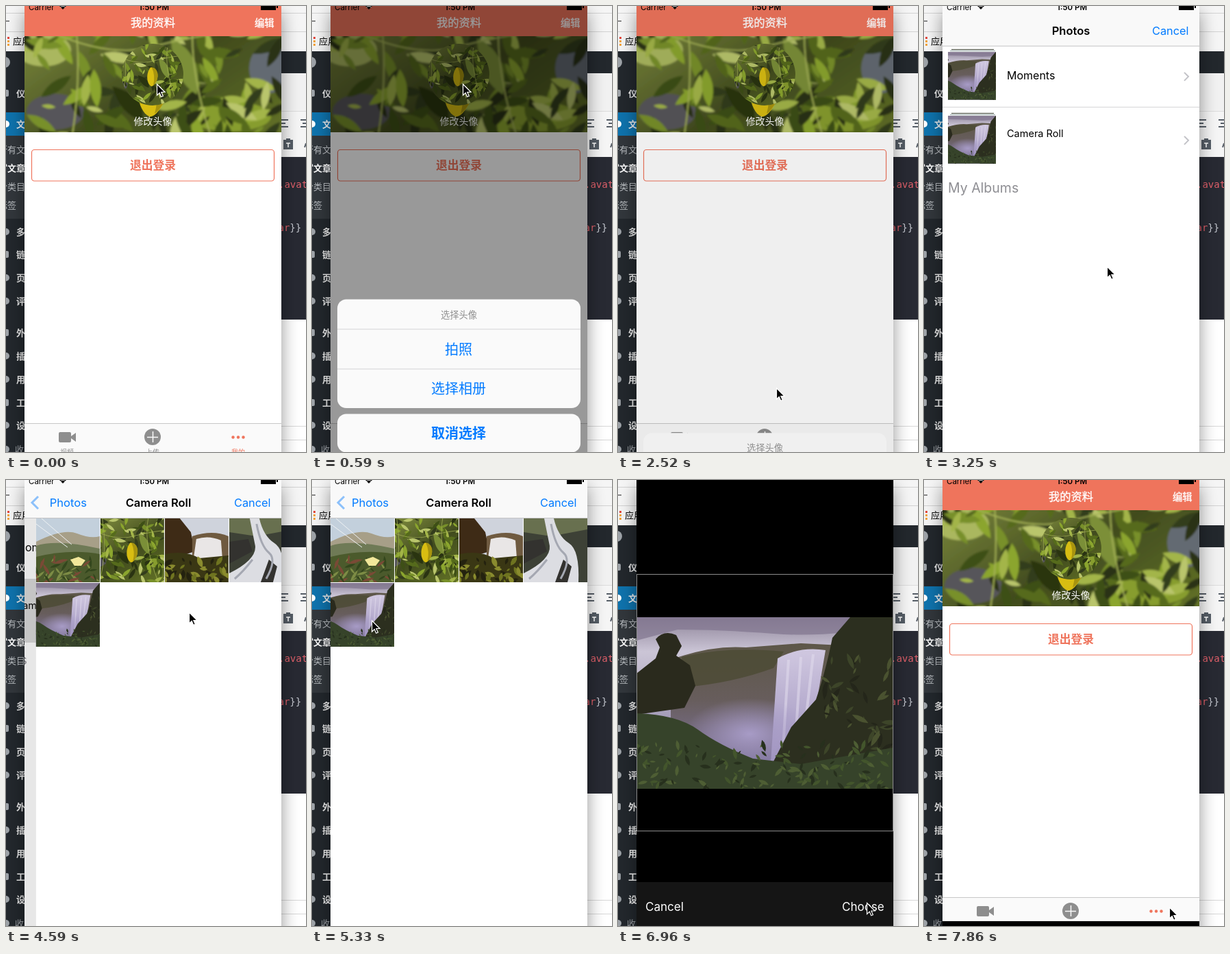
These frames come from a looping animation (438x650 px, 8 s). An HTML page:

```html
<!DOCTYPE html>
<html lang="zh">
<head>
<meta charset="utf-8">
<style>
  html, body { margin: 0; width: 100%; height: 100%; overflow: hidden; background: #fff; }
  svg { display: block; }
  text { font: 16px Inter, "Noto Sans CJK SC", "Noto Sans CJK", sans-serif; }
  .mid { text-anchor: middle; }
  .bold { font-weight: 600; }
  .medium { stroke: #fff; stroke-width: .35px; }
  .blue { fill: #007aff; }
  .code { font: 14px "DejaVu Sans Mono", monospace; }
  .line { stroke: #d4d4d6; }
</style>
</head>
<body>
<svg width="438" height="650" viewBox="0 0 438 650">
  <defs>
    <clipPath id="screen"><rect x="27" y="-9" width="375" height="667"/></clipPath>
    <clipPath id="round"><circle cx="214" cy="100" r="45"/></clipPath>
    <filter id="shadow" x="-20%" width="140%"><feGaussianBlur stdDeviation="13"/></filter>
    <filter id="soft" x="0" y="0" width="100%" height="100%"><feGaussianBlur stdDeviation="1.5"/></filter>
    <linearGradient id="leafBg" x2="1" y2="1"><stop stop-color="#8d9a45"/><stop offset=".5" stop-color="#414b1e"/><stop offset="1" stop-color="#6d7e28"/></linearGradient>
    <linearGradient id="sky" x2="0" y2="1"><stop stop-color="#8d8398"/><stop offset=".2" stop-color="#cbc5d6"/><stop offset="1" stop-color="#7d729a"/></linearGradient>
    <linearGradient id="cliff" x2="0" y2="1"><stop stop-color="#5d5748"/><stop offset=".45" stop-color="#675d5c"/><stop offset="1" stop-color="#8176a3"/></linearGradient>
    <linearGradient id="fallFill" x2="0" y2="1"><stop stop-color="#d0c8e0"/><stop offset="1" stop-color="#9d91bd"/></linearGradient>
    <radialGradient id="mist"><stop stop-color="#a79bc6"/><stop offset="1" stop-color="#a79bc6" stop-opacity="0"/></radialGradient>

    <symbol id="pepper" viewBox="0 0 375 250" preserveAspectRatio="xMidYMid slice">
      <g filter="url(#soft)">
        <rect x="-9" y="-9" width="393" height="268" fill="url(#leafBg)"/>
        <ellipse cx="358" cy="102" rx="30" ry="36" fill="#646a72"/>
        <ellipse cx="45" cy="165" rx="42" ry="26" fill="#56555a"/>
        <ellipse cx="28" cy="75" rx="40" ry="24" fill="#aab75e"/>
        <ellipse cx="300" cy="172" rx="60" ry="22" fill="#879d2e"/>
        <g id="leaves"></g>
        <path d="M214 58Q262 80 252 140Q216 120 214 58Z" fill="#7b8f38"/>
        <path d="M128 128Q140 170 172 178Q178 140 128 128Z" fill="#2a3410"/>
        <path d="M20 40Q120 90 190 70T375 40M70 0Q90 120 60 250M250 0Q230 100 290 250" fill="none" stroke="#a5b256" stroke-width="2"/>
      </g>
      <path d="M180 95C206 98 214 126 204 150Q192 174 182 172C164 164 158 120 180 95Z" fill="#d8bd12"/>
      <path d="M184 95C208 98 214 126 204 150Q198 162 190 168Q200 130 184 95Z" fill="#a8940f"/>
    </symbol>

    <symbol id="falls" viewBox="0 0 375 250" preserveAspectRatio="xMidYMid slice">
      <rect width="375" height="250" fill="url(#sky)"/>
      <path d="M0 0H375V12Q280 30 200 24T60 18L0 34Z" fill="#80768f" opacity=".7"/>
      <path d="M50 62Q110 40 160 44L240 38L320 42V220H50Z" fill="url(#cliff)"/>
      <path d="M66 58Q130 42 215 50L200 74Q140 96 70 102Z" fill="#4b4a34" opacity=".8"/>
      <path d="M206 60Q238 42 276 48L262 130L240 212H196Z" fill="url(#fallFill)"/>
      <path d="M222 62L214 190M240 58L232 180M258 54L246 160" stroke="#e0daec" stroke-width="4" opacity=".6"/>
      <ellipse cx="165" cy="170" rx="95" ry="52" fill="url(#mist)"/>
      <path d="M375 0H312L286 30Q276 80 262 120L226 160L198 214L230 250H375Z" fill="#2c2f1f"/>
      <g id="rock"></g>
      <path d="M0 82L28 60L34 44L28 32Q40 18 58 26L66 42L58 56L78 70L86 100L70 132L0 142Z" fill="#2a2a1d"/>
      <path d="M0 140Q60 142 90 164T170 206L240 214L375 190V250H0Z" fill="#36432a"/>
      <g id="grass"></g>
    </symbol>

    <symbol id="dune" viewBox="0 0 93 93">
      <rect width="93" height="93" fill="#c3d0dc"/>
      <path d="M0 34Q40 14 60 22T93 26V93H0Z" fill="#a79f88"/>
      <path d="M0 40Q30 30 93 44V60H0Z" fill="#6f7a56"/>
      <path d="M0 56Q50 44 93 52V93H0Z" fill="#4b5a2c"/>
      <path d="M0 8L46 42M8 0L52 38" stroke="#eef1f3"/>
      <g id="stalks"></g>
      <path d="M50 60L62 56L72 61L66 69H56Z" fill="#f1e79a"/>
    </symbol>

    <symbol id="cascade" viewBox="0 0 93 93">
      <rect width="93" height="93" fill="#cfd3dc"/>
      <path d="M0 0H22L38 20L44 48L0 62Z" fill="#3e2b16"/>
      <path d="M40 26Q70 16 93 26V56H40Z" fill="#6f5a40"/>
      <path d="M46 30Q64 24 82 32L84 58H42Z" fill="#e9e6e6"/>
      <path d="M0 52Q30 46 50 58L93 54V93H0Z" fill="#3a3714"/>
      <g id="moss"></g>
    </symbol>

    <symbol id="stream" viewBox="0 0 93 93">
      <rect width="93" height="93" fill="#3d4136"/>
      <path d="M0 0H93V16L40 26L0 20Z" fill="#68704f"/>
      <path d="M30 0H44Q50 26 66 36T80 93H0V80Q40 60 38 40Z" fill="#dcdde2"/>
      <path d="M0 34L28 30L34 48L0 66ZM58 60L70 70L64 93H46Z" fill="#33322f"/>
      <path d="M40 8Q46 40 58 50T54 88M34 60Q20 78 8 88" fill="none" stroke="#a5a8b2" stroke-width="3"/>
    </symbol>

    <g id="stack">
      <path d="M40 60.5H102" stroke="#333a2c"/><path d="M38 62.5H104" stroke="#8fa0a0"/>
      <use href="#falls" x="35" y="64" width="70" height="70"/>
      <path d="M380 94L386 100L380 106" fill="none" stroke="#c2c2c7" stroke-width="2"/>
    </g>
  </defs>

  <!-- desktop behind the phone -->
  <rect width="438" height="650" fill="#fff"/>
  <rect width="438" height="66" fill="#f5f5f5"/>
  <path d="M0 10.5H438M0 37.5H438" stroke="#d2d2d2"/>
  <path d="M0 22H5" stroke="#888" stroke-width="2"/>
  <path d="M2 45h3v3h-3z" fill="#e2483d"/><path d="M2 50h3v3h-3zM2 55h3v3h-3z" fill="#f2a33a"/>
  <text x="10" y="56" style="font-size:13px">应用</text>
  <rect y="66" width="438" height="32" fill="#23282d"/>
  <rect y="66" width="27" height="584" fill="#23282d"/>
  <rect y="188" width="27" height="122" fill="#32373c"/>
  <rect y="155" width="27" height="34" fill="#0f73ad"/>
  <circle cx="-2" cy="82" r="8" fill="#9ea3a8"/>
  <g id="menu"></g>
  <rect x="402" y="98" width="36" height="122" fill="#f1f1f1"/>
  <rect x="402" y="153" width="36" height="67" fill="#f5f5f5"/>
  <path d="M402 153.5H438" stroke="#ddd"/>
  <path d="M400 166H412M400 171H408M400 176H412M430 166H438M433 171H438M430 176H438" stroke="#555d66" stroke-width="2"/>
  <path d="M405 195H419V209H405ZM409 193H415V196H409Z" fill="#555d66"/>
  <path d="M409 200H415M412 200V206" stroke="#fff" stroke-width="1.5"/>
  <path d="M438 200L436 206" stroke="#555d66" stroke-width="2"/>
  <rect x="402" y="220" width="36" height="237" fill="#282a33"/>
  <text class="code" x="398" y="265" fill="#e0606a">.avat</text>
  <text class="code" x="397.500" y="328" fill="#e0606a">ar<tspan fill="#c5c8d0">}}</tspan></text>
  <path d="M402 612.5H438M402 632.5H438" stroke="#d8d8d8"/>
  <rect x="27" y="10" width="375" height="720" opacity=".42" filter="url(#shadow)"/>

  <g clip-path="url(#screen)">
    <!-- profile page -->
    <rect x="27" width="375" height="650" fill="#fff"/>
    <rect x="27" width="375" height="44" fill="#ef745c"/>
    <g fill="#fff" class="medium">
      <text class="mid" x="214.500" y="30" style="font-size:16.300px">我的资料</text>
      <text x="363" y="30" style="font-size:14.300px">编辑</text>
    </g>
    <use href="#pepper" x="27" y="44" width="375" height="140"/>
    <g clip-path="url(#round)"><use href="#pepper" x="169" y="55" width="90" height="90"/></g>
    <text class="mid" x="214.500" y="173" fill="#fff" style="font-size:14px">修改头像</text>
    <rect x="37.500" y="209.500" width="354" height="45.500" rx="4" fill="none" stroke="#ef745c" stroke-width="1.200"/>
    <text class="mid" x="214.500" y="238" fill="#ef745c" style="font-size:16.800px;font-weight:700">退出登录</text>
    <rect x="27" y="608" width="375" height="50" fill="#fafafa"/>
    <path d="M27 608.500H402" stroke="#c8c8c8"/>
    <g fill="#8e8e8e">
      <rect x="77" y="621" width="18" height="15" rx="2"/><path d="M95 627L102 622V635L95 630Z"/>
      <circle cx="214" cy="628" r="12"/>
      <path d="M206 628.500H222M214.500 620V636" stroke="#fafafa" stroke-width="1.500"/>
      <g class="mid"><text x="89" y="654" style="font-size:10px">视频</text><text x="214" y="654" style="font-size:10px">上传</text></g>
    </g>
    <g fill="#ef745c">
      <circle cx="331.500" cy="628.500" r="2.200"/><circle cx="339" cy="628.500" r="2.200"/><circle cx="346.500" cy="628.500" r="2.200"/>
      <text class="mid" x="339" y="654" style="font-size:10px">我的</text>
    </g>

    <!-- action sheet -->
    <rect id="veil" x="27" width="375" height="650"/>
    <g id="sheet" class="mid">
      <g id="cards"><rect x="37" y="427" width="355" height="158.500" rx="13"/><rect x="37" y="594" width="355" height="56" rx="13"/></g>
      <path class="line" d="M37 470.500H392M37 528.500H392"/>
      <text x="214.500" y="454" fill="#8f8f8f" style="font-size:13.300px">选择头像</text>
      <g class="blue">
        <text x="214" y="507" style="font-size:20px">拍照</text>
        <text x="214" y="564" style="font-size:20px">选择相册</text>
        <text x="214" y="629" style="font-size:20px;font-weight:700">取消选择</text>
      </g>
    </g>

    <!-- photo picker -->
    <g id="picker">
      <rect x="27" y="-9" width="375" height="667" fill="#fff"/>
      <g id="list">
        <rect id="press" x="27" y="145" width="375" height="92" fill="#d9d9d9"/>
        <path class="line" d="M27 144.500H402"/>
        <use href="#stack"/><use href="#stack" y="93"/>
        <text x="121" y="104">Moments</text>
        <text x="121" y="188" style="font-size:14.500px">Camera Roll</text>
        <text id="count" x="122" y="208" style="font-size:12px">5</text>
        <text x="35" y="269" fill="#8e8e93" style="font-size:19.500px">My Albums</text>
      </g>
      <rect id="dimList" x="27" width="375" height="650"/>
      <g id="roll">
        <rect x="27" width="375" height="667" fill="#fff"/>
        <use href="#dune" x="27" y="56" width="93" height="93"/>
        <use href="#pepper" x="121" y="56" width="93" height="93"/>
        <use href="#cascade" x="215" y="56" width="93" height="93"/>
        <use href="#stream" x="309" y="56" width="93" height="93"/>
        <use href="#falls" x="27" y="150" width="93" height="93"/>
      </g>
      <rect id="dimRoll" x="27" y="56" width="375" height="602"/>
      <g id="nav">
        <rect x="27" y="-9" width="375" height="64" fill="#f9f9f9"/>
        <path d="M27 55.500H402" stroke="#c4c4c6"/>
        <text id="listTitle" class="mid bold" y="39" style="font-size:16.500px">Photos</text>
        <g id="back" class="blue">
          <path d="M47 24L38 33L47 42" fill="none" stroke="#8cc0fa" stroke-width="3"/>
          <text id="backText" class="mid" y="39" style="font-size:16.500px">Photos</text>
        </g>
        <text id="rollTitle" class="mid bold" y="39" style="font-size:16.500px">Camera Roll</text>
        <text class="blue" x="333" y="39" style="font-size:16.300px">Cancel</text>
      </g>
    </g>

    <!-- status bar -->
    <text x="33" y="6" style="font-size:11.500px">Carrier</text>
    <path d="M78 0Q83 -4 88 0L83 5Z"/><path d="M79.500 1.500Q83 -1 86.500 1.500" fill="none" stroke="#fff" stroke-width=".8"/>
    <text class="mid bold" x="216" y="6" style="font-size:11.500px">1:50 PM</text>
    <path d="M372 -4H394V6H372ZM395 -1H397V3H395Z"/>

    <!-- crop view -->
    <g id="crop">
      <rect x="27" y="-9" width="375" height="667"/>
      <use href="#falls" x="27" y="200" width="375" height="250"/>
      <rect x="27.500" y="137.500" width="374" height="374" fill="none" stroke="#8c8c8c"/>
      <rect x="27" y="586" width="375" height="72" fill="#151515"/>
      <g fill="#fff"><text x="40" y="628" style="font-size:17px">Cancel</text><text x="327" y="628" style="font-size:17px">Choose</text></g>
    </g>
  </g>

  <path id="cursor" d="M.5 0V16L4.200 12.500L6.700 18.300L9.300 17.200L6.800 11.500H12Z" stroke="#fff" stroke-width="1.200"/>
</svg>
<script>
const $ = id => document.getElementById(id);
const move = (id, x, y = 0) => $(id).setAttribute('transform', `translate(${x} ${y})`);
const fade = (id, o) => $(id).setAttribute('opacity', o);

let seed = 7;
const rnd = () => (seed = seed * 16807 % 2147483647) / 2147483647;

// Fills a box with randomly turned flecks of half size w by h.
function scatter(id, n, colors, [x, y, bw, bh], w, h) {
  let out = '';
  for (let i = 0; i < n; i++) {
    const k = 0.5 + rnd(), a = rnd() * 180 | 0;
    const at = `translate(${(x + rnd() * bw).toFixed(1)} ${(y + rnd() * bh).toFixed(1)}) rotate(${a}) scale(${k.toFixed(2)})`;
    out += `<path d="M${-w} 0Q0 ${-h} ${w} 0Q0 ${h} ${-w} 0Z" transform="${at}" fill="${colors[i % colors.length]}"/>`;
  }
  $(id).innerHTML = out;
}
scatter('leaves', 170, ['#8ba52e', '#2a3312', '#a3b548', '#566b1c', '#b9c56c', '#3e4f16', '#78902a', '#333c1c'], [0, 0, 375, 250], 19, 11);
scatter('rock', 50, ['#3d4529', '#24261a', '#4a5230'], [275, 60, 100, 140], 9, 5);
scatter('grass', 150, ['#43552c', '#27301d', '#4e5e34'], [0, 185, 375, 65], 6, 4);
scatter('stalks', 45, ['#33461d', '#7d8c45', '#7a4a36'], [0, 58, 93, 35], 7, 3);
scatter('moss', 40, ['#6f7420', '#24220f', '#8a8b2e'], [0, 60, 93, 33], 6, 5);

// Admin menu
const item = (s, x, y, weight, fill) =>
  `<text x="${x}" y="${y + 5}" fill="${fill}" style="font-size:13px;font-weight:${weight}">${s}</text>`;
const tops = [127, 172, 329, 362, 396, 430, 476, 510, 544, 578, 611, 646];
$('menu').innerHTML =
  [...'仪文多链页评外插用工设收'].map((c, i) => item(c, i == 11 ? 13 : 15, tops[i], i == 11 ? 400 : 600, i == 11 ? '#a0a5aa' : '#eee') +
    (i % 3 ? `<circle cx="0" cy="${tops[i]}" r="5" fill="${i == 1 ? '#fff' : '#9ea3a8'}"/>`
           : `<rect x="-4" y="${tops[i] - 5}" width="8" height="10" rx="2" fill="#9ea3a8"/>`)).join('') +
  ['所有文章', '写文章', '分类目录', '标签'].map((s, i) =>
    item(s, -11, 209 + 27 * i, i == 1 ? 700 : 500, i == 1 ? '#fff' : '#b9bdc1')).join('');

// Share of a critically damped move still to go.
function rest(t, start, speed = 17) {
  const x = Math.max(0, t - start) * speed / 1000;
  return (1 + x) * Math.exp(-x);
}

const pointer = [
  [0, 220, 114], [593, 220, 114], [1333, 240, 522], [1926, 231, 557], [2519, 231, 557],
  [3259, 267, 380], [3556, 298, 318], [3704, 296, 312], [4000, 270, 160], [4148, 267, 193],
  [4593, 267, 193], [5333, 87, 205], [5926, 87, 205], [6815, 368, 610], [7111, 358, 623], [8000, 358, 623]
];
function pointerAt(t) {
  const i = pointer.findIndex(p => p[0] > t);
  const [t0, x0, y0] = pointer[i - 1], [t1, x1, y1] = pointer[i];
  const u = (t - t0) / (t1 - t0), e = u * u * (3 - 2 * u);
  return [x0 + (x1 - x0) * e, y0 + (y1 - y0) * e];
}

const LOOP = 8000, STEP = LOOP / 54;

function draw(t) {
  const open = t < 2378 ? 1 - rest(t, 230, 23) : rest(t, 2378, 23.7);
  fade('veil', 0.4 * open);
  move('sheet', 0, 231 * (1 - open));
  const g = 238 + 12 * open;
  $('cards').setAttribute('fill', `rgb(${g},${g},${g})`);

  const drop = 667 * (rest(t, 2812) + 1 - rest(t, 7560, 19.5));
  const push = rest(t, 4306), next = rest(t, 5729);
  move('picker', 0, drop);
  move('list', -112.5 * (1 - push));
  fade('dimList', 0.1 * (1 - push));
  fade('press', t > 4306 ? 1 : 0);
  fade('count', t > 3700 ? 1 : 0);
  move('roll', 375 * push - 112.5 * (1 - next));
  fade('dimRoll', 0.1 * (1 - next));

  move('nav', -375 * (1 - next));
  move('listTitle', 85 + 129.5 * push);
  fade('listTitle', Math.max(0, 2 * push - 1));
  move('backText', 85 + 129.5 * push);
  fade('back', Math.min(1, 1.05 * (1 - push)));
  move('rollTitle', 214 + 188 * push);
  fade('rollTitle', Math.min(1, 1.05 * (1 - push)));

  move('crop', 375 * next, drop);
  move('cursor', ...pointerAt(t));
}

function tick(now) {
  draw(Math.min(53, Math.floor((now % LOOP + 12) / STEP)) * STEP);
  requestAnimationFrame(tick);
}
draw(0);
requestAnimationFrame(tick);
</script>
</body>
</html>
```
